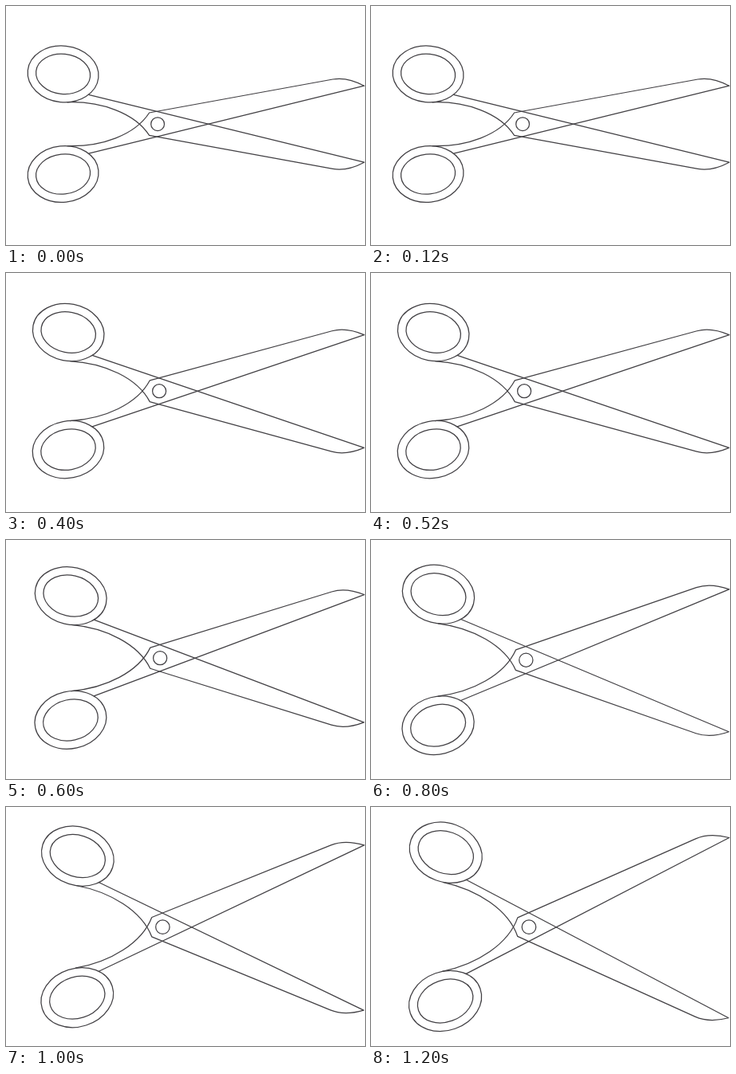
Animation, 450 px wide and 300 px high, one loop 1400 ms. Source, as an HTML page with a canvas:

```html
<!DOCTYPE html>
<html lang="en">
<head>
<meta charset="utf-8">
<title>Scissors</title>
<style>
  html, body { margin: 0; width: 100%; height: 100%; overflow: hidden; background: #fff; }
  canvas { display: block; }
</style>
</head>
<body>
<canvas id="stage" width="450" height="300"></canvas>
<script>
const ctx = document.getElementById('stage').getContext('2d');
const STEP = 200;
const STEPS = 7;
const DEG = Math.PI / 180;
const LINE = 1.25;
const RIGHT = 449;

// Shape coordinates are measured from the screw, for the half whose blade points down
const TIP = { x: 258.9, y: 48 };
const RING = { x: -118.5, y: -62.8 };

function ellipse(a, b) {
  ctx.beginPath();
  ctx.ellipse(RING.x, RING.y, a, b, 6 * DEG, 0, Math.PI * 2);
  ctx.stroke();
}

// side is 1 for the blade pointing down, -1 for its mirror image
function drawHalf(angle, side) {
  ctx.save();
  ctx.scale(1, side);
  ctx.rotate(angle);

  ellipse(44.5, 35.3);
  ellipse(34.1, 25.1);

  ctx.beginPath();
  ctx.moveTo(-113.5, -27.4);
  ctx.bezierCurveTo(-70.5, -28.8, -28.5, -13.8, -10.5, 14.2);
  ctx.lineTo(219.5, 56.2);
  ctx.bezierCurveTo(232.5, 58.6, 245.5, 55.2, TIP.x, TIP.y);
  ctx.lineTo(-86.5, -36.9);
  ctx.stroke();
  ctx.restore();
}

function draw(time) {
  const step = Math.floor(time / STEP) % STEPS;
  // The halves open 14 degrees in whole degrees
  const opening = Math.round(step * 14 / (STEPS - 1));
  const lower = opening * DEG;
  const upper = lower * 0.97;
  const scale = 1 + 0.0019 * opening + 0.00009 * opening ** 2;

  // The upper tip stays on the right edge; the view drops once midway
  const reach = TIP.x * Math.cos(upper) - TIP.y * Math.sin(upper);
  const x = RIGHT - scale * reach;
  const y = 148.2 + 2.5 * Math.floor(step / 4);

  ctx.fillStyle = '#fff';
  ctx.fillRect(0, 0, 450, 300);
  ctx.strokeStyle = '#424044';
  ctx.lineJoin = 'round';
  ctx.lineWidth = LINE / scale;

  ctx.save();
  ctx.translate(x, y);
  ctx.scale(scale, scale);
  drawHalf(lower, 1);
  drawHalf(upper, -1);
  ctx.beginPath();
  ctx.arc(0, 0, 8.4, 0, Math.PI * 2);
  ctx.stroke();
  ctx.restore();
}

const start = performance.now();
function tick() {
  draw(performance.now() - start);
  requestAnimationFrame(tick);
}
tick();
</script>
</body>
</html>
```
